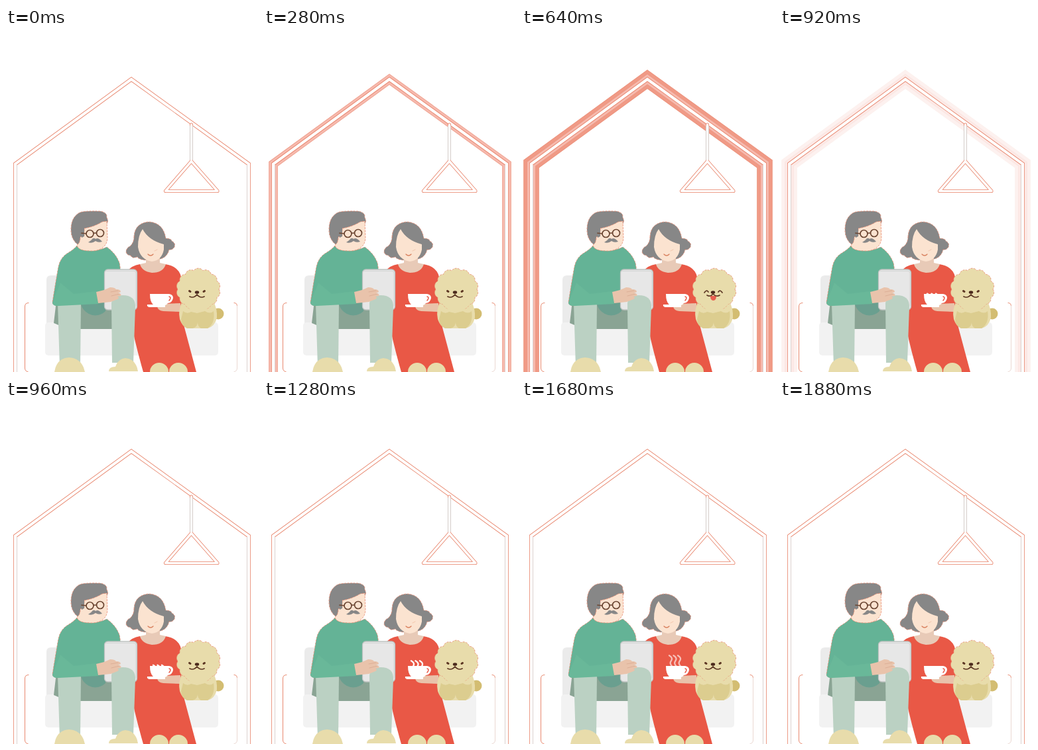
Write an HTML page that moves like this. It is 380x520 px and loops after 1.92 s.

```html
<!DOCTYPE html>
<html lang="en">
<head>
<meta charset="utf-8">
<title>Couple at home</title>
<style>
  html, body { margin: 0; width: 100%; height: 100%; overflow: hidden; background: #fff; }
  svg { display: block; width: 380px; height: 520px; }
  .line { fill: none; stroke-linecap: round; stroke-linejoin: round; }
  .fringe { stroke: #e9896f; stroke-width: .8; stroke-dasharray: 3 1.5; }
  .hair { fill: #878787; }
  .skin { fill: #fbe3d0; }
  .hand { fill: #e9c3ab; }
  .cream { fill: #e8dcab; }
  .trousers { fill: #bbd1c3; }
  .brown { stroke: #5b3522; stroke-width: 1.7; }
</style>
</head>
<body>
<svg viewBox="0 0 380 520">
  <defs>
    <path id="house" d="M14 535V205.500L189 77.500L366 205.500V535"/>
    <path id="lamp" d="M279.500 146V201.500L240.500 246.500H319L279.500 201.500"/>
    <path id="wisp" d="M0 0c4 2 5 5 3 8s-2 5 2 9"/>
    <clipPath id="aboveCup"><rect x="216" y="380" width="30" height="22.500"/></clipPath>
  </defs>

  <g fill="none" stroke-miterlimit="8">
    <g id="outerGlow">
      <use href="#house" stroke="#e98a72" stroke-width="23.500"/>
      <use href="#house" stroke="#f09a86" stroke-width="22.300"/>
    </g>
    <g id="innerGlow">
      <use href="#house" stroke="#eb917b" stroke-width="13.500"/>
      <use href="#house" stroke="#f6b9ad" stroke-width="12.300"/>
    </g>
    <use href="#house" stroke="#e67c61" stroke-width="5.900"/>
    <use href="#house" stroke="#fff" stroke-width="4.400"/>
    <path d="M16.500 207V520M363.500 207V520" stroke="#dcd2cf"/>
  </g>
  <g class="line">
    <use href="#lamp" stroke="#e67c61" stroke-width="5"/>
    <use href="#lamp" stroke="#fff" stroke-width="3.500"/>
    <path d="M277.500 148V199M281.500 148V199" stroke="#d5cdca"/>
    <path d="M34 415.500Q28.500 415.500 28.500 421V514Q28.500 519 33 519.500M344 415.500Q348.500 415.500 348.500 420" stroke="#e9896f"/>
    <path d="M348.500 420V514Q348.500 519 344 519.500" stroke="#ead8d2"/>
  </g>

  <!-- sofa -->
  <path fill="#ebebeb" d="M61 381Q61 374 68 374H190V460H61Z"/>
  <rect x="59" y="445" width="261" height="50" rx="5" fill="#f2f2f2"/>

  <!-- woman -->
  <path class="hair fringe" d="M193 316Q194 295 215 293Q237 294 241 318Q249 318 250 322Q256 325 254 331Q251 336 246 335Q244 343 238 347Q229 352 214 351Q201 351 198 346Q190 349 188 344Q181 343 181 337Q183 331 187 330Q193 324 193 316Z"/>
  <path fill="#e95846" d="M202 357Q189 359 183 368L186 432Q194 475 207 520H287L267 445L264 376Q260 360 240 357Q222 374 202 357Z"/>
  <path fill="#e8cab7" d="M211 345H232V355L241 357Q237 370 220 370Q205 368 202 357L211 355Z"/>
  <path class="skin" d="M206 304Q215 321 238 327V335Q235 351 220 353Q202 350 199 331Q199 313 206 304Z"/>
  <path class="line" d="M214 342Q218 346 222 342" stroke="#d9825f" stroke-width="1.300"/>
  <path class="line" d="M224 337L228 335" stroke="#f3c7ad"/>
  <path class="hand" d="M228 421L238 417L263 416V429L237 428Q229 427 228 421Z"/>
  <g clip-path="url(#aboveCup)">
    <g id="steam" class="line" stroke="#fff" stroke-width="2.300">
      <use href="#wisp" x="222"/><use href="#wisp" x="228.500"/><use href="#wisp" x="235"/>
    </g>
  </g>
  <path fill="#fff" d="M217 402H246Q252 403 252 408Q251 415 244 416Q242 419 240 419V422H216Q212 421 213 418H222Q217 414 217 402Z"/>
  <path class="line" d="M246 406Q250 407 246 412" stroke="#e95846" stroke-width="1.500"/>

  <!-- man -->
  <path fill="#8aa494" d="M76 412L72 446Q90 455 112 455H168V405H76Z"/>
  <path class="fringe" fill="#64b396" d="M107 329Q103 334 95 339Q82 346 79 361Q75 383 70 415Q71 420 80 420L150 418L174 400Q174 370 171 355Q166 341 152 331Q130 342 107 329Z"/>
  <path fill="#6a9f8f" d="M112 415H150V428Q142 436 130 434Q116 430 112 415Z"/>
  <path class="trousers" d="M78 417L113 417L112 512H81Z"/>
  <path fill="#69b899" d="M70 415Q80 390 82 385L102 402L136 398L139 417L80 420Q70 421 70 415Z"/>
  <rect x="148.500" y="365" width="49" height="61" rx="5" fill="#e7e7e7" stroke="#bfc3c1" stroke-width="1.300"/>
  <path class="line" d="M151 367.500H193Q196 367.500 196 371V420" stroke="#d4d6d5"/>
  <path class="trousers" d="M159 416Q160 404 176 404Q195 404 195 421L192 506H160Z"/>
  <path class="hand" d="M136 399L148 396L157 392Q164 392 166 395Q173 395 173 399L169 401Q175 401 173 405L168 406Q172 408 168 410L158 414L139 416Z"/>
  <path class="line" d="M158 399L169 397M159 405L171 402" stroke="#d6a78f" stroke-width=".7"/>
  <path class="cream" d="M73 520Q76 499 95 498Q115 499 119 520ZM155 519Q155 512 165 512Q169 500 180 499Q196 500 199 519Z"/>
  <path class="hair fringe" d="M109 328Q98 320 98 305Q98 286 111 279Q118 276 143 277Q153 279 152 287Q155 291 152 296L120 306L115 326Z"/>
  <path class="skin fringe" d="M118 303Q134 300 145 293L152 292L153 318Q152 327 147 331Q140 337 129 337Q108 337 107 328Q112 325 112 316L118 314Z"/>
  <path class="hair" d="M113 301H118V315L114 317ZM124 324Q129 321 131 318Q134 317 135 319Q139 316 145 323Q139 325 135 322Q130 326 124 324Z"/>
  <g class="line" stroke="#6b4632" stroke-width="1.700">
    <circle cx="126.500" cy="311" r="5.500"/>
    <circle cx="142" cy="310" r="5.500"/>
    <path d="M114 310L121 311M132 310H136.500"/>
  </g>
  <g class="cream"><circle cx="231" cy="520" r="14"/><circle cx="260" cy="520" r="14"/></g>

  <!-- dog -->
  <circle cx="320" cy="432" r="8.500" fill="#d3bd72"/>
  <path class="cream" d="M266 412Q259 427 262 440Q266 453 278 454H304Q315 451 318 438Q319 424 312 412Z"/>
  <path fill="#dccd8f" d="M267 428Q273 433 279 429L288 431L300 428Q308 433 313 428Q316 446 304 454H294Q289 451 289 445Q288 453 281 454H273Q264 450 264 440Z"/>
  <path id="fur" class="cream fringe"/>
  <path class="cream" d="M264 408Q272 427 289 429Q307 428 317 408Z"/>
  <ellipse cx="288" cy="399.500" rx="3.200" ry="2.300" fill="#4a291c"/>
  <g id="calm" class="line brown">
    <path d="M276.500 397.500L278 398.500M298 398.500L299.500 397.500" stroke-width="3"/>
    <path d="M277 406Q283 409 288 403Q293 409 299 406"/>
  </g>
  <g id="happy" class="line brown">
    <path d="M275 400Q278 395 281 399M296 399Q299 395 302 400"/>
    <path d="M284 405H293Q293 412 288.500 412Q284 412 284 405Z" fill="#e95f50" stroke="none"/>
    <path d="M279 404Q284 407 288 402Q293 407 298 404"/>
  </g>
</svg>
<script>
const LOOP = 1920, STEP = 40;
const el = id => document.getElementById(id);
const ramp = (t, from, to) => Math.min(1, Math.max(0, (t - from) / (to - from)));
const show = (id, opacity) => el(id).setAttribute("opacity", opacity);

function furPath(bumps) {
  let d = "";
  for (let i = 0; i <= bumps; i++) {
    const a = i / bumps * 2 * Math.PI;
    const point = `${290 + 31 * Math.cos(a)} ${395 + 29 * Math.sin(a)}`;
    d += i ? `A8.5 8.5 0 0 1 ${point}` : `M${point}`;
  }
  return d + "Z";
}

function draw(now) {
  const t = Math.floor(now % LOOP / STEP) * STEP;
  const fadeOut = 1 - ramp(t, 640, 960);
  const happy = t >= 400 && t < 840;
  show("innerGlow", (t >= 280) * fadeOut);
  show("outerGlow", ramp(t, 280, 600) * fadeOut);
  show("happy", +happy);
  show("calm", +!happy);
  show("steam", (t >= 920) * (1 - ramp(t, 1560, 1880)));
  el("steam").setAttribute("transform", `translate(0 ${402 - 19 * ramp(t, 900, 1840)})`);
  requestAnimationFrame(() => draw(performance.now()));
}

el("fur").setAttribute("d", furPath(14));
draw(performance.now());
</script>
</body>
</html>
```
